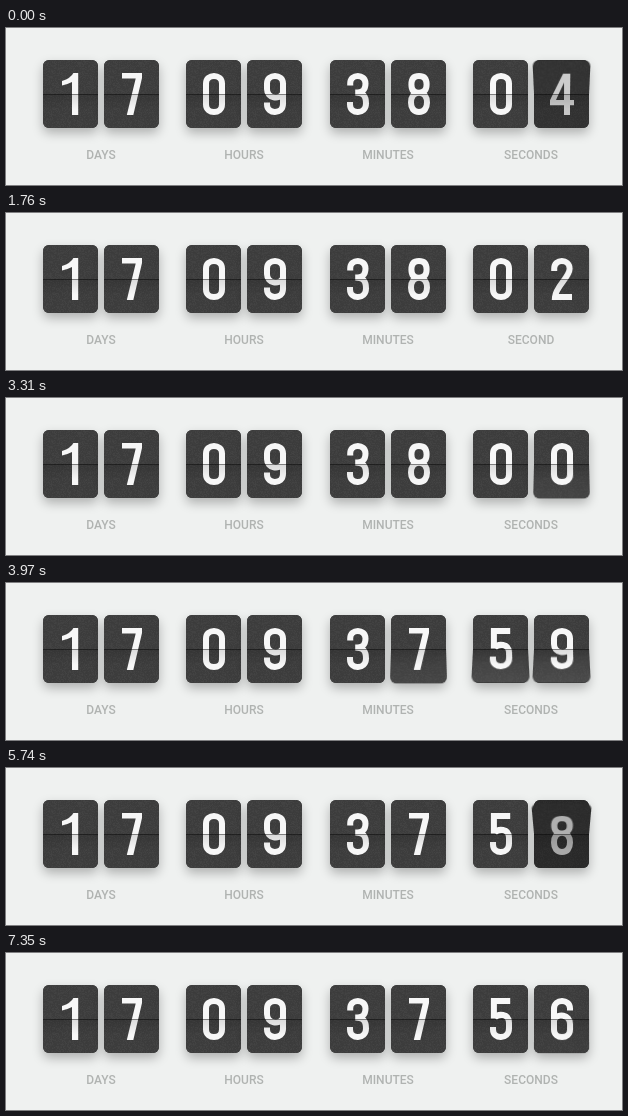
An HTML page with a canvas that plays this animation: 616 px wide and 157 px high, repeating every 7410 ms.

```html
<!DOCTYPE html>
<html lang="en">
<head>
<meta charset="utf-8">
<title>Countdown</title>
<style>
html, body { margin: 0; width: 100%; height: 100%; overflow: hidden; background: #eff1f0; }
canvas { display: block; }
</style>
</head>
<body>
<canvas id="stage" width="616" height="157"></canvas>
<script>
const ctx = document.getElementById('stage').getContext('2d');
const W = 55, H = 68, HALF = 34, TOP = 32, HINGE = TOP + HALF, RADIUS = 6, PAD = 2;
const LOOP = 7410, FLIP = 800, DEPTH = 215;
const BG = '#eff1f0', CARD = '#3d3d3d', INK = '#f7f7f7';

const starts = [-97, 814, 1740, 2650, 3638, 4620, 5612, 6560];
const seconds = [4, 3, 2, 1, 0, 59, 58, 57, 56];
const MINUTE_FLIP = 4, MINUTE_DELAY = 18;

// Glyphs are centred on the hinge: some are pen strokes, some filled outlines.
const strokes = {
  0: 'M-8-10.5C-8-20.5 8-20.5 8-10.5V10.5C8 20.5-8 20.5-8 10.5Z',
  2: 'M-7.8-8V-10.5C-7.8-20.5 7.6-20.5 7.6-10.2C7.6-2-6.4 8-7 18H10',
  3: 'M-7.8-8.5V-10.5C-7.8-20.5 7.5-20.5 7.5-10.5C7.5-4 5-1.5-2.8-1.5C5.5-1.5 8 2 8 9.5C8 20.8-8 20.8-8 10.5V8',
  5: 'M9.2-18H-7.1V-.5M-6.5-1C-3-5.5 8-6 8 4V9.5C8 20.8-8 20.8-8 10.5V8',
  6: 'M8-8.5V-10.5C8-20.5-8-20.5-8-10V10.5C-8 20.5 8 20.5 8 10.5V5C8-5-4.5-5.5-7.5 0',
  8: 'M0-1.3C-5-1.3-7.6-4-7.6-9.6S-5-18 0-18 7.6-15.2 7.6-9.6 5-1.3 0-1.3' +
     'C5.5-1.3 8 3 8 8.6S5.5 18 0 18-8 14.3-8 8.6-5.5-1.3 0-1.3Z'
};
const fills = {
  1: 'M2.4-21H7.2V21H1V-12Q-4-9.4-9-8.5V-13Q0-16 2.4-21Z',
  4: 'M1-21H8V6H12V11.3H8V21H2V11.3H-12V6.3ZM2 6V-12L-6 6Z',
  7: 'M-10-21H10V-16L1.3 21H-5.2L3.7-15.5H-10Z'
};

function makeCanvas(w, h) {
  const c = document.createElement('canvas');
  c.width = w;
  c.height = h;
  return c;
}

function makeGrain() {
  const c = makeCanvas(W, H), g = c.getContext('2d');
  let seed = 7;
  const rand = () => (seed = seed * 16807 % 2147483647) / 2147483647;
  for (let y = 0; y < H; y++) {
    for (let x = 0; x < W; x++) {
      const v = rand() - 0.5;
      g.fillStyle = `rgba(${v > 0 ? '255,255,255' : '0,0,0'},${Math.abs(v) * 0.07})`;
      g.fillRect(x, y, 1, 1);
    }
  }
  return c;
}

function makeFace(digit, grain) {
  const c = makeCanvas(W, H), g = c.getContext('2d');
  g.fillStyle = CARD;
  g.beginPath();
  g.roundRect(0, 0, W, H, RADIUS);
  g.fill();
  g.globalCompositeOperation = 'source-atop';
  g.drawImage(grain, 0, 0);

  g.save();
  g.translate(W / 2 + 0.5, HALF);
  if (digit === 9) g.rotate(Math.PI);
  g.fillStyle = g.strokeStyle = INK;
  g.lineWidth = 6;
  if (fills[digit]) g.fill(new Path2D(fills[digit]), 'evenodd');
  else g.stroke(new Path2D(strokes[digit === 9 ? 6 : digit]));
  g.restore();

  const crease = g.createLinearGradient(0, HALF, 0, HALF + 16);
  crease.addColorStop(0, 'rgba(0,0,0,.12)');
  crease.addColorStop(1, 'rgba(0,0,0,0)');
  g.fillStyle = crease;
  g.fillRect(0, HALF, W, HALF);
  return c;
}

const grain = makeGrain();
const faces = Array.from({ length: 10 }, (_, d) => makeFace(d, grain));

// The clear margin lets warped edges blend smoothly.
const scratch = makeCanvas(W + 2 * PAD, HALF + 2 * PAD), sg = scratch.getContext('2d');

function bounce(t) {
  const k = 7.5625;
  if (t < 1 / 2.75) return k * t * t;
  if (t < 2 / 2.75) return k * (t - 1.5 / 2.75) ** 2 + 0.75;
  if (t < 2.5 / 2.75) return k * (t - 2.25 / 2.75) ** 2 + 0.9375;
  return k * (t - 2.625 / 2.75) ** 2 + 0.984375;
}

// Loads one half of a face into the scratch canvas, tinted.
function loadHalf(digit, lower, tint) {
  sg.globalCompositeOperation = 'source-over';
  sg.clearRect(0, 0, scratch.width, scratch.height);
  sg.drawImage(faces[digit], 0, lower ? HALF : 0, W, HALF, PAD, PAD, W, HALF);
  sg.globalCompositeOperation = 'source-atop';
  sg.fillStyle = tint;
  sg.fillRect(PAD, PAD, W, HALF);
}

function drawHalf(x, digit, lower, shade) {
  loadHalf(digit, lower, `rgba(0,0,0,${shade})`);
  ctx.drawImage(scratch, x - PAD, (lower ? HINGE : TOP) - PAD);
}

// Projects the scratch half row by row as a leaf turned about the hinge.
function drawLeaf(x, angle, lower) {
  const c = Math.abs(Math.cos(angle)), s = Math.sin(angle);
  const reach = HALF * c * DEPTH / (DEPTH - HALF * s);
  const source = y => Math.min(HALF + PAD, y * DEPTH / (c * DEPTH + y * s));
  for (let y = 0; y < reach; y++) {
    const a = source(y), b = source(y + 1);
    const w = scratch.width * DEPTH / (DEPTH - (a + b) / 2 * s);
    const left = x + (W - w) / 2;
    const from = PAD + (lower ? a : HALF - b);
    const to = lower ? HINGE + y : HINGE - y - 1;
    ctx.drawImage(scratch, 0, from, scratch.width, b - a, left, to, w, 1);
  }
}

function drawSeam(x) {
  ctx.fillStyle = 'rgba(0,0,0,.42)';
  ctx.fillRect(x, HINGE, W, 1);
}

function drawCard(x, from, to, progress) {
  ctx.save();
  ctx.shadowColor = 'rgba(0,0,0,.27)';
  ctx.shadowOffsetY = 5;
  ctx.shadowBlur = 11;
  ctx.fillStyle = CARD;
  ctx.beginPath();
  ctx.roundRect(x, TOP, W, H, RADIUS);
  ctx.fill();
  ctx.restore();

  if (from === to || progress >= 1) {
    ctx.drawImage(faces[to], x, TOP);
    drawSeam(x);
    return;
  }
  const angle = bounce(progress) * Math.PI;
  const s = Math.sin(angle), c = Math.cos(angle);
  drawHalf(x, to, false, 0.4 * Math.max(0, c));
  drawHalf(x, from, true, 0.55 * s);
  if (c > 0) {
    loadHalf(from, false, `rgba(0,0,0,${0.5 * s})`);
    drawLeaf(x, angle, false);
  } else {
    const glow = sg.createLinearGradient(0, PAD, 0, PAD + HALF);
    glow.addColorStop(0, 'rgba(255,255,255,0)');
    glow.addColorStop(1, `rgba(255,255,255,${0.2 * s})`);
    loadHalf(to, true, glow);
    drawLeaf(x, angle, true);
  }
  drawSeam(x);
}

function drawPair(x, from, to, progress, label) {
  drawCard(x, Math.floor(from / 10), Math.floor(to / 10), progress);
  drawCard(x + 61, from % 10, to % 10, progress);
  ctx.fillStyle = '#b0b3b1';
  ctx.fillText(label, x + 58, 131);
}

function render(now) {
  const t = now % LOOP;
  const i = starts.filter(s => s <= t).length - 1;
  const progress = (t - starts[i]) / FLIP;
  const minuteAge = t - starts[MINUTE_FLIP] - MINUTE_DELAY;
  const minute = minuteAge < 0 ? 38 : 37;

  ctx.fillStyle = BG;
  ctx.fillRect(0, 0, 616, 157);
  ctx.font = '500 12px Roboto, sans-serif';
  ctx.textAlign = 'center';
  drawPair(37, 17, 17, 1, 'DAYS');
  drawPair(180, 9, 9, 1, 'HOURS');
  drawPair(324, 38, minute, minuteAge / FLIP, 'MINUTES');
  drawPair(467, seconds[i], seconds[i + 1], progress, seconds[i + 1] === 1 ? 'SECOND' : 'SECONDS');
}

const begin = performance.now();
function tick() {
  render(performance.now() - begin);
  requestAnimationFrame(tick);
}
tick();
</script>
</body>
</html>
```
